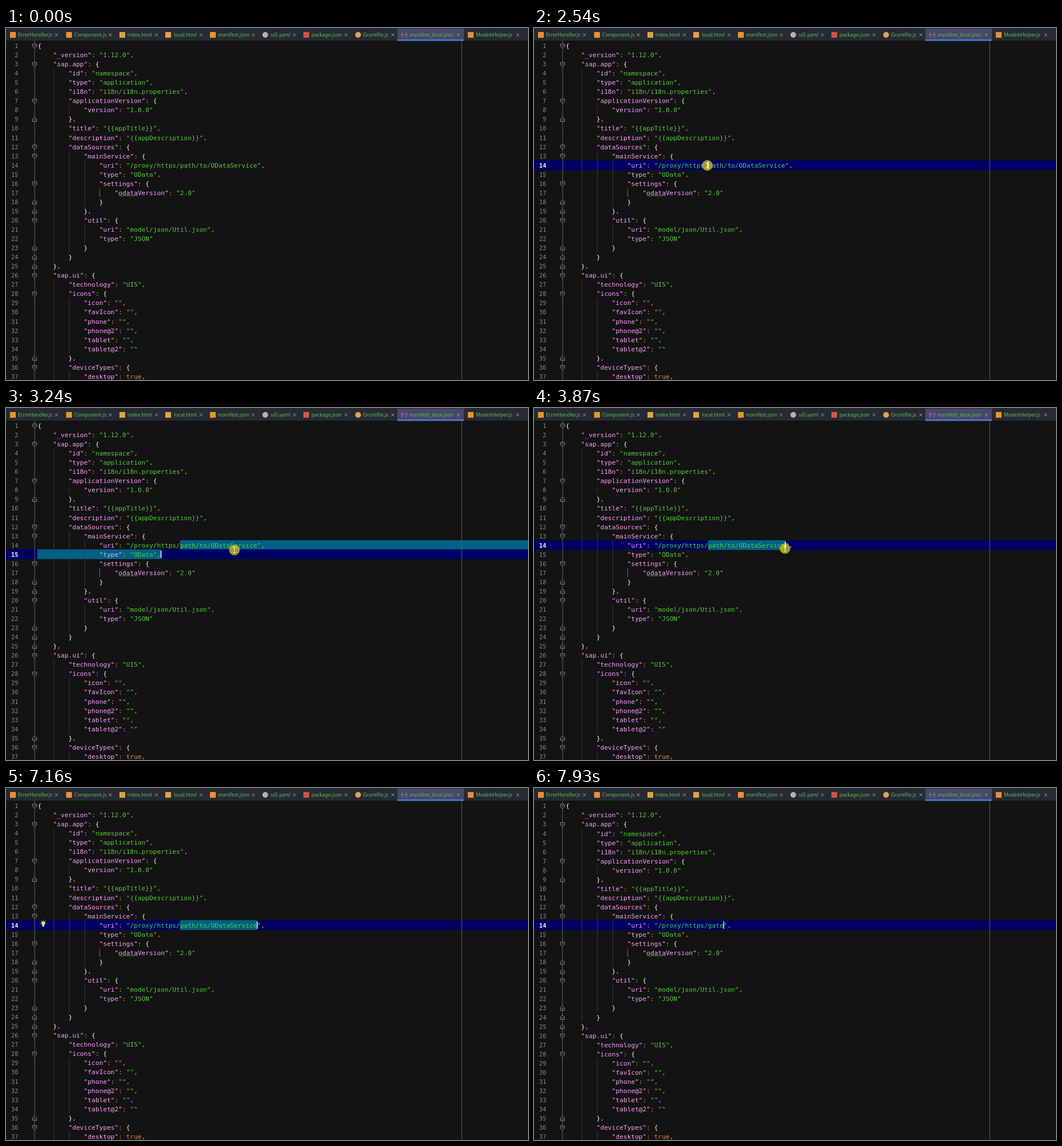
An HTML page with a canvas that plays this animation: 911x615 px, repeating every 8000 ms.

```html
<!DOCTYPE html>
<html lang="en">
<head>
<meta charset="utf-8">
<style>
html, body { margin: 0; width: 100%; height: 100%; overflow: hidden; background: #131313; }
canvas { display: block; }
</style>
</head>
<body>
<canvas id="stage" width="911" height="615"></canvas>
<script>
const ctx = document.getElementById('stage').getContext('2d');
const LOOP = 8000, W = 911, H = 615, LEFT = 55.2, CHAR = 6.72, PITCH = 16.05;
const MONO = '"DejaVu Sans Mono", "Noto Sans Mono", monospace';
const UI = '"Noto Sans", "Open Sans", sans-serif';
const PINK = '#ff9cff', GREEN = '#54cc3c', ORANGE = '#e6913c', WHITE = '#f4f4f4';

const CODE = `{
    "_version": "1.12.0",
    "sap.app": {
        "id": "namespace",
        "type": "application",
        "i18n": "i18n/i18n.properties",
        "applicationVersion": {
            "version": "1.0.0"
        },
        "title": "{{appTitle}}",
        "description": "{{appDescription}}",
        "dataSources": {
            "mainService": {
                "uri": "/proxy/https/path/to/ODataService",
                "type": "OData",
                "settings": {
                    "odataVersion": "2.0"
                }
            },
            "util": {
                "uri": "model/json/Util.json",
                "type": "JSON"
            }
        }
    },
    "sap.ui": {
        "technology": "UI5",
        "icons": {
            "icon": "",
            "favIcon": "",
            "phone": "",
            "phone@2": "",
            "tablet": "",
            "tablet@2": ""
        },
        "deviceTypes": {
            "desktop": true,`.split('\n');

// name, icon x, text x, close x, icon colour, round icon
const TABS = [
  ['ErrorHandler.js', 12, 21, 88, '#e8932c'],
  ['Component.js', 110, 119, 182, '#e8932c'],
  ['index.html', 203, 212, 262.5, '#e0a33c'],
  ['local.html', 283, 293, 340.5, '#e0a33c'],
  ['manifest.json', 361, 370, 431.5, '#e8932c'],
  ['ui5.yaml', 452.5, 462, 503.5, '#b9b4a4', 1],
  ['package.json', 524, 533, 593.5, '#d0573f'],
  ['Gruntfile.js', 614.5, 623, 675, '#dfa556', 1],
  ['manifest_local.json', 695.5, 704, 789.5, ''],
  ['ModelsHelper.js', 811, 820, 893, '#e8932c'],
];
const OPEN = [1, 3, 7, 12, 13, 16, 20, 26, 28, 36];
const CLOSE = [9, 18, 19, 23, 24, 25, 35];
// column, first line, last line
const GUIDES = [[4, 4, 24], [4, 27, 37], [8, 8, 8], [8, 13, 23], [8, 29, 34], [8, 37, 37],
  [12, 14, 18], [12, 21, 22], [16, 17, 17]];
// time, x, y of the pointer
const DRAG = [[2540, 302.5, 240], [2710, 304, 238], [2800, 312, 232.5], [3010, 350, 265],
  [3240, 398.5, 248], [3510, 430, 249], [3870, 438, 245.5], [4040, 438, 245.5], [4110, 439, 243.5]];

const rowY = n => 31 + (n - 1) * PITCH;
const colX = c => LEFT + c * CHAR;
const rect = (x, y, w, h, color) => { ctx.fillStyle = color; ctx.fillRect(x, y, w, h); };
const dot = (x, y, r, color) => {
  ctx.fillStyle = color;
  ctx.beginPath();
  ctx.arc(x, y, r, 0, 7);
  ctx.fill();
};
const line = (color, width, ...p) => {
  ctx.strokeStyle = color;
  ctx.lineWidth = width;
  ctx.beginPath();
  for (let i = 0; i < p.length; i += 2) ctx.lineTo(p[i], p[i + 1]);
  ctx.stroke();
};

function pointer(t) {
  if (t < 780 || t >= 4430) return null;
  if (t < 1620) {
    const left = 1 - Math.min(10, Math.floor((t - 780) / 75)) / 10;
    return [329 + 470 * left ** 1.75, 265 + 326 * left ** 2];
  }
  if (t < 2540) {
    const k = Math.min(1, (t - 1620) / 540);
    return [329 - 25 * k, 265 - 25 * k];
  }
  const i = DRAG.findIndex(p => p[0] > t);
  if (i < 0) return DRAG[DRAG.length - 1].slice(1);
  const a = DRAG[i - 1], b = DRAG[i], k = (t - a[0]) / (b[0] - a[0]);
  return [a[1] + (b[1] - a[1]) * k, a[2] + (b[2] - a[2]) * k];
}

function typed(t) {
  if (t < 7235) return null;
  return 'gate'.slice(0, 1 + (t >= 7310) + (t >= 7550) + (t >= 7700));
}

// line and column of the caret
function caretAt(t, mouse, word) {
  if (t < 2540) return null;
  if (word) return [14, 37 + word.length];
  if (t >= 3870) return [14, 57];
  const row = Math.floor((mouse[1] - 31 + PITCH / 2) / PITCH) + 1;
  const col = t < 2710 ? 37 : Math.round((mouse[0] - LEFT) / CHAR);
  return [row, Math.min(col, CODE[row - 1].length)];
}

function drawTabs() {
  rect(0, 0, W, 22, '#262a33');
  rect(683, 1, 116, 21, '#47476a');
  rect(683, 20, 116, 2.5, '#4c7fd6');
  ctx.font = '8.6px ' + UI;
  for (const [name, ix, tx, cx, color, round] of TABS) {
    if (!color) {
      ctx.fillStyle = '#b9a8e0';
      ctx.fillText('{··}', ix - 6, 14.5);
    } else if (round) dot(ix, 12, 5, color);
    else rect(ix - 5, 7, 10, 10, color);
    ctx.fillStyle = '#62bd50';
    ctx.fillText(name, tx, 15);
    line('#969aa2', 1, cx - 2.5, 9.5, cx + 2.5, 14.5);
    line('#969aa2', 1, cx + 2.5, 9.5, cx - 2.5, 14.5);
  }
}

function drawFold(n, dir, x, shift) {
  const y = rowY(n) + 0.5 + shift;
  ctx.fillStyle = '#131313';
  ctx.strokeStyle = '#8c8c8c';
  ctx.lineWidth = 1;
  ctx.beginPath();
  for (const [dx, dy] of [[-3.5, -3.5], [3.5, -3.5], [3.5, 1], [0, 4], [-3.5, 1]])
    ctx.lineTo(x + dx, y + dy * dir);
  ctx.closePath();
  ctx.fill();
  ctx.stroke();
  line('#8c8c8c', 1, x - 1.7, y - 0.5 * dir, x + 1.7, y - 0.5 * dir);
}

function drawCode(text, y) {
  for (const m of text.matchAll(/"[^"]*"|true|[{}:,]/g)) {
    const s = m[0], isKey = text[m.index + s.length] === ':';
    ctx.fillStyle = s[0] === '"' ? (isKey ? PINK : GREEN) : /[{}]/.test(s) ? WHITE : ORANGE;
    ctx.fillText(s, colX(m.index), y);
  }
}

function drawBulb(alpha) {
  ctx.globalAlpha = alpha;
  for (let a = Math.PI; a < 6.4; a += Math.PI / 4) {
    const c = Math.cos(a), s = Math.sin(a);
    line('#e8cf4a', 1, 65 + 4.4 * c, 236 + 4.4 * s, 65 + 6 * c, 236 + 6 * s);
  }
  dot(65, 236, 3.3, '#f7dc52');
  rect(63.3, 239, 3.4, 3, '#d8d8d8');
  ctx.globalAlpha = 1;
}

function drawRowMarks([row, col], selecting) {
  const top = n => Math.floor(rowY(n) - 8);
  rect(0, top(row), W, 17, '#000066');
  if (!selecting) return;
  for (let n = 14; n <= row; n++) {
    const from = n === 14 ? colX(37) : LEFT - 0.5;
    rect(from, top(n), (n === row ? colX(col) : W) - from, n === row ? 17 : 16, '#006085');
  }
}

function draw(t) {
  const mouse = pointer(t), word = typed(t), caret = caretAt(t, mouse, word);
  const shift = t >= 7550 ? 0.35 : 0, foldX = 50 - shift;
  rect(0, 0, W, H, '#131313');
  if (caret) drawRowMarks(caret, !word && t >= 2710);

  for (const [c, a, b] of GUIDES) {
    const x = Math.round(colX(c) + 0.7) + 0.5;
    line(c === 16 ? '#6a6a6a' : '#373737', 1, x, rowY(a) - 8, x, rowY(b) + 8);
  }
  line('#626262', 1, foldX, 22, foldX, H);
  line('#5c5c5c', 1, 795.5, 22, 795.5, H);
  OPEN.forEach(n => drawFold(n, 1, foldX, shift));
  CLOSE.forEach(n => drawFold(n, -1, foldX, shift));

  CODE.forEach((text, i) => {
    const n = i + 1, current = caret && caret[0] === n;
    const y = Math.round(rowY(n) + 4 + shift);
    ctx.font = (current ? 'bold ' : '') + '10.2px ' + MONO;
    ctx.fillStyle = current ? '#f4f4f4' : '#8a8a8a';
    ctx.textAlign = 'right';
    ctx.fillText(n, 21.3, y);
    ctx.textAlign = 'left';
    ctx.font = '11.16px ' + MONO;
    drawCode(word && n === 14 ? text.replace('path/to/ODataService', word) : text, y);
  });

  const wave = [];
  for (let x = 196; x <= 230; x += 2) wave.push(x, 293.2 + (x % 4 ? -1 : 1));
  line('#4f9a45', 0.9, ...wave);

  drawTabs();
  if (t >= 4580 && !word) drawBulb(t < 4730 ? 0.4 : t < 5200 ? 0.75 : 1);
  if (mouse) {
    const [x, y] = mouse;
    if (t >= 2540) dot(x, y, 9.3, 'rgba(205,190,30,.8)');
    const ink = t >= 2540 ? '#f4f4d0' : '#c8c8c8';
    line(ink, 1, x, y - 4.5, x, y + 4.5);
    line(ink, 1, x - 2.5, y - 4.5, x + 2.5, y - 4.5);
    line(ink, 1, x - 2.5, y + 4.5, x + 2.5, y + 4.5);
  }
  const hidden = (t >= 5600 && t < 6070) || (t >= 6530 && t < 7080);
  if (caret && !hidden) rect(colX(caret[1]) - 0.4, rowY(caret[0]) - 6.5, 1.4, 13, '#fff');
}

function frame(now) {
  draw(now % LOOP);
  requestAnimationFrame(frame);
}
draw(0);
requestAnimationFrame(frame);
</script>
</body>
</html>
```
